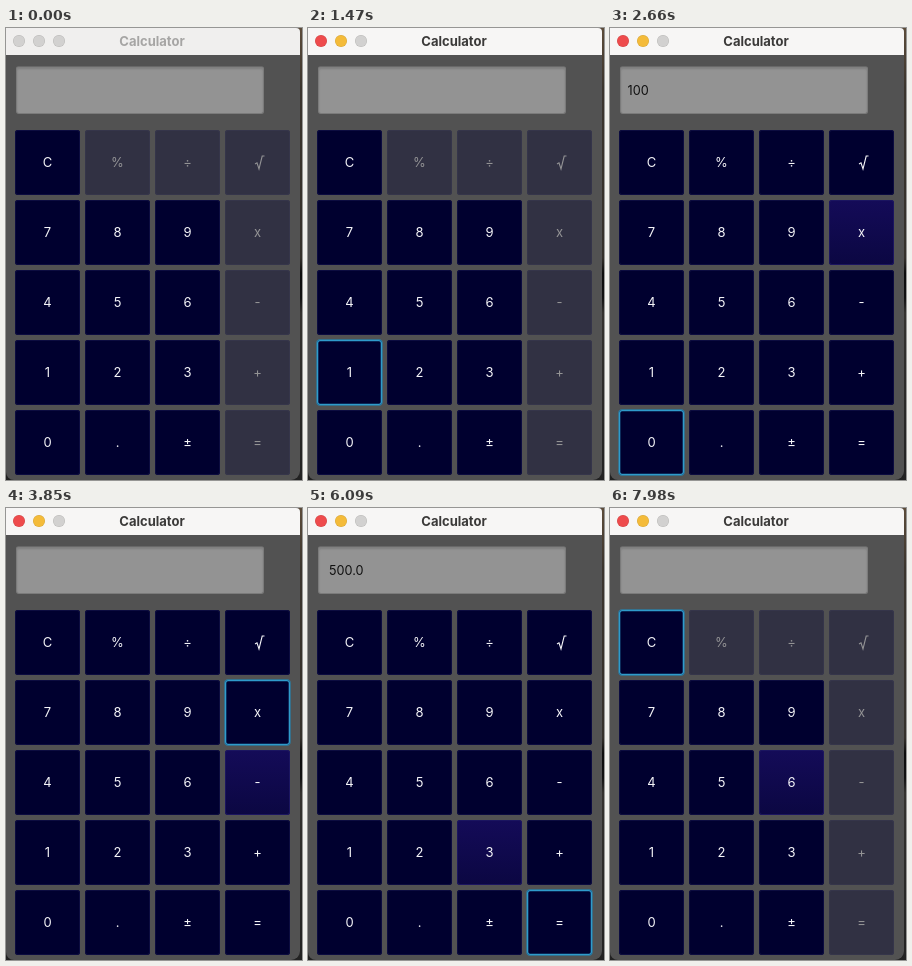
Write an HTML page that moves like this. It is 296 by 452 pixels and loops after 8 s.

```html
<!DOCTYPE html>
<html lang="en">
<head>
<meta charset="utf-8">
<title>Calculator</title>
<style>
html, body { margin: 0; width: 100%; height: 100%; overflow: hidden; }
body { background: #252422; }
#stage { position: relative; width: 296px; height: 452px; overflow: hidden;
  font: 13px Inter, "Open Sans", sans-serif;
  background: linear-gradient(#5c4c3a, #3a342d 60px, #34302b 230px, #0c0c0c 245px, #111 270px, #34322f 285px, #222); }
#win { position: absolute; left: 0; top: 0; width: 294px; height: 452px; overflow: hidden;
  background: #525252; border-radius: 0 4px 9px 8px; }
#bar { position: absolute; left: 0; top: 0; width: 294px; height: 27px; background: #f0efee; }
#bar b { position: absolute; left: 0; width: 292px; top: 0; line-height: 26px; text-align: center; color: #a6a5a4; }
#bar i { position: absolute; top: 7px; width: 12px; height: 12px; border-radius: 50%;
  background: #d2d1d0; box-shadow: inset 0 0 0 .5px #0002; }
#bar.on { background: #f7f6f5; }
#bar.on b { color: #3b3a39; }
#bar.on .red { background: #ee4b4c; }
#bar.on .amber { background: #f4bb39; }
#field { position: absolute; left: 10px; top: 38px; width: 248px; height: 48px; box-sizing: border-box;
  border: 1px solid #7b7b7b; border-top-color: #686868; border-radius: 3px; background: #939393;
  box-shadow: inset 0 2px 2px #0002; padding-left: 6.5px; line-height: 47px;
  font-size: 12.7px; color: #111; white-space: pre; }
.key { position: absolute; width: 65px; height: 65px; border-radius: 3px; color: #f4f4f8;
  background: #00002f; box-shadow: inset 0 0 0 1px #0c0c40; line-height: 65px; text-align: center; }
.key svg { position: absolute; left: 0; top: 0; }
.hover { background: linear-gradient(#140b58, #0b0742); box-shadow: inset 0 0 0 1px #1b1560; }
.off { opacity: .4; }
.focus { box-shadow: inset 0 0 0 1.3px #2f9bcb, 0 0 0 .7px #2b7fa5; }
</style>
</head>
<body>
<div id="stage"><div id="win">
  <div id="bar">
    <i class="red" style="left:7px"></i><i class="amber" style="left:27px"></i><i style="left:47px"></i>
    <b>Calculator</b>
  </div>
  <div id="field"></div>
</div></div>
<script>
const LOOP = 8000;
const LABELS = [..."C%÷√789x456-123+0.±="];
const OPERATORS = "%÷√x-+=";
const ROOT = '<svg width="65" height="65" fill="none" stroke="#f4f4f8" stroke-width="1.1">' +
  '<path d="M30 34l2-1.2 2 6.2 3.2-13h2.3"/></svg>';

// time, key under the pointer ("" = none)
const hovers = [
  [280, "3"], [350, "5"], [560, "8"], [700, "7"], [840, "4"], [1050, "1"], [1680, "0"],
  [2310, "."], [2380, "2"], [2450, "3"], [2520, "6"], [2590, "-"], [2660, "x"],
  [3850, "-"], [3920, "6"], [3990, "5"],
  [4830, "3"], [4900, "±"], [4970, "="],
  [6020, "+"], [6090, "3"], [6160, "8"], [6230, ""], [6580, "C"],
  [7280, ""], [7350, "7"], [7420, "8"], [7490, "5"], [7560, "6"]
];
// press time, release time, key, display after release
const clicks = [
  [1400, 1540, "1", "1"], [1820, 1960, "0", "10"], [2030, 2170, "0", "100"],
  [3290, 3500, "x", ""], [4550, 4690, "5", "5"],
  [5460, 5600, "=", " 500.0"], [6930, 7140, "C", ""]
];
const ACTIVE_AT = 1330, ENABLED = [1540, 7140];

const win = document.getElementById("win");
const bar = document.getElementById("bar");
const field = document.getElementById("field");

const keys = LABELS.map((label, i) => {
  const el = document.createElement("div");
  el.className = "key";
  el.style.left = 9 + i % 4 * 70 + "px";
  el.style.top = 102 + Math.floor(i / 4) * 70 + "px";
  if (label === "√") el.innerHTML = ROOT;
  else el.textContent = label;
  win.append(el);
  return { label, el };
});

const latest = (list, t, col = 0) => list.filter(e => e[col] <= t).pop();

function draw(t) {
  const hover = latest(hovers, t);
  const press = latest(clicks, t);
  const done = latest(clicks, t, 1);
  const held = press && t < press[1];
  const enabled = t >= ENABLED[0] && t < ENABLED[1];

  bar.classList.toggle("on", t >= ACTIVE_AT);
  field.textContent = done ? done[3] : "";
  for (const { label, el } of keys) {
    el.classList.toggle("off", !enabled && OPERATORS.includes(label));
    el.classList.toggle("hover", !held && !!hover && hover[1] === label);
    el.classList.toggle("focus", !!press && press[2] === label);
  }
}

const start = performance.now();
function tick() {
  draw((performance.now() - start) % LOOP);
  requestAnimationFrame(tick);
}
tick();
</script>
</body>
</html>
```
